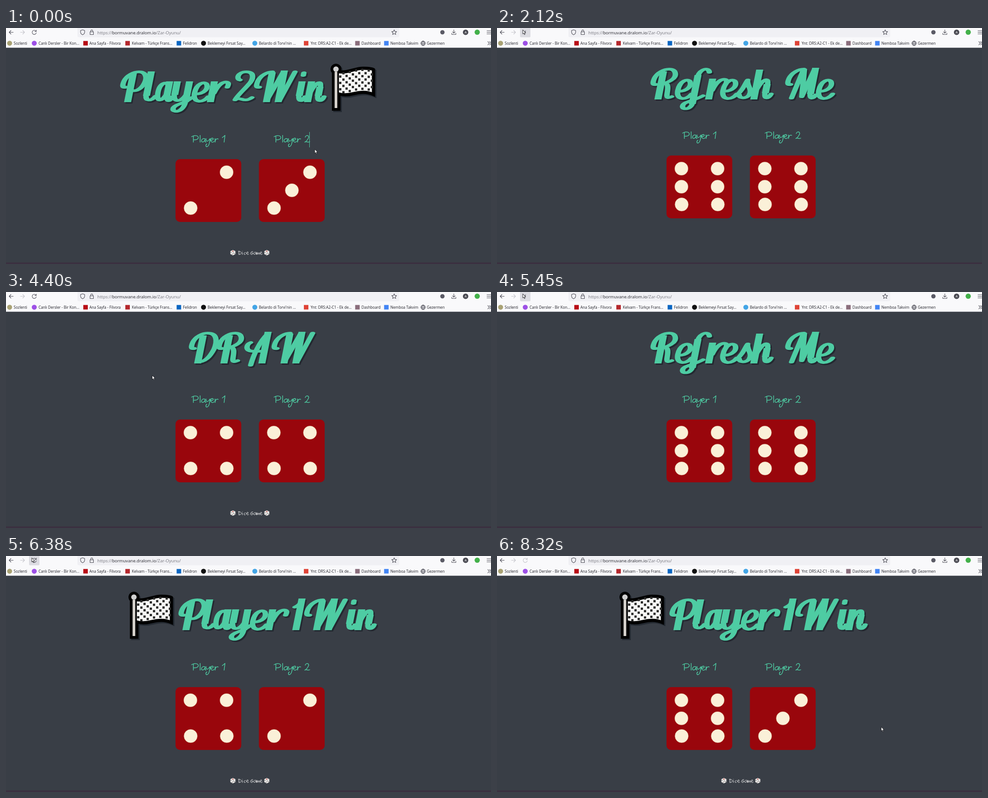
Write an HTML page that moves like this. It is 1073x522 px and loops after 8420 ms.

```html
<!DOCTYPE html>
<html lang="tr">
<head>
<meta charset="utf-8">
<title>Dice Game</title>
<style>
html, body { margin: 0; width: 100%; height: 100%; overflow: hidden; background: #393e46; }
svg { display: block; width: 1073px; height: 522px; }
text { font-family: "Open Sans", "Noto Sans", sans-serif; }
.line { fill: none; stroke: #4b4b55; stroke-width: 1.1; stroke-linecap: round; stroke-linejoin: round; }
.title { filter: drop-shadow(3px 3px 0 #232931); }
.pen { fill: none; stroke: #4ecca3; stroke-width: 7.8; stroke-linejoin: round; }
.pen .curve { stroke-width: 6; stroke-linecap: round; }
.hand { fill: none; stroke-width: 1.5; stroke-linecap: round; stroke-linejoin: round; }
.pip { fill: #faf0d8; stroke: #d9a184; stroke-width: .5; }
</style>
</head>
<body>
<svg viewBox="0 0 1073 522">
  <rect width="1073" height="522" fill="#393e46"/>
  <rect y="518.5" width="1073" height="4" fill="#3b3040"/>
  <g id="page"></g>
  <rect width="1073" height="43.5" fill="#f9f9fb"/>
  <path d="M0 43.3H1073" stroke="#cfcfd6" stroke-width=".7"/>
  <path d="M158 0H870V17Q870 20.5 866 20.5H162Q158 20.5 158 17Z" fill="#f0f0f4"/>
  <rect id="reloadBox" x="51" y="-4" width="23" height="24.5" rx="2"/>
  <rect id="markBox" x="54" y="25" width="111" height="17" rx="2" fill="#dcdce2"/>
  <g class="line">
    <path d="M16 9.5H7M11 5.5L7 9.5L11 13.5"/>
    <path d="M32 9.5H41M37 5.5L41 9.5L37 13.5" stroke="#c4c4ca"/>
    <path id="reload" d="M66.3 7A4.6 4.6 0 1 0 67 10.5M67 4.5V7.8H63.7"/>
    <path id="stop" d="M59.5 6.5L63.500 10.500M63.500 6.500L59.500 10.500"/>
    <path d="M169.500 4L174 5.600V9C174 12 172 14 169.500 15C167 14 165 12 165 9V5.600Z"/>
    <path d="M186 8.500H193.500V14.500H186ZM187.500 8.500V6.200A2.300 2.300 0 0 1 192 6.200V8.500"/>
    <path d="M858.800 4L860.400 7.600L864.300 8L861.400 10.600L862.200 14.400L858.800 12.400L855.400 14.400L856.200 10.600L853.300 8L857.200 7.600Z"/>
    <path d="M990.800 4V11M987.800 8.300L990.800 11.300L993.800 8.300M986.300 11.500V14.300H995.300V11.500"/>
    <path d="M1064 6H1073M1064 9.500H1073M1064 13H1073"/>
    <path d="M1066 30L1069.500 33.700L1066 37.400M1070 30L1073.500 33.700L1070 37.400"/>
    <circle cx="922.800" cy="33.700" r="4.800"/>
    <path d="M918 33.700H927.600M922.800 29C919.500 32 919.500 36 922.800 38.500C926 36 926 32 922.800 29"/>
  </g>
  <circle cx="965.500" cy="9.500" r="4.800" fill="#5b5b66"/>
  <circle cx="1016.800" cy="9.500" r="6" fill="#4a4a52"/>
  <text x="1016.800" y="12.300" font-size="7.500" fill="#fff" text-anchor="middle">A</text>
  <circle cx="1042.500" cy="9.300" r="5.800" fill="#43b04a"/>
  <text x="202" y="13.500" font-size="9.600" fill="#77777f"><tspan>https:</tspan><tspan>//</tspan><tspan fill="#25252c">bormuvane.dralom.io</tspan><tspan>/Zar-Oyunu/</tspan></text>
  <g id="marks" font-size="8.200" fill="#1d1d24"></g>
  <circle id="click" r="8.500" fill="#ece33a" opacity=".9"/>
  <path id="cursor" d="M0 0V9.200L2.100 7.300L3.600 10.700L5.100 10L3.600 6.800H6.400Z" fill="#fff" stroke="#15151a" stroke-width=".9"/>
</svg>
<script>
const LOOP = 8420;
const $ = id => document.getElementById(id);

// Broad-pen lettering: [flat-ended stems, round-ended curves]; x is in units of two pixels.
const swash = 'M3 -33C-1 -31 -1 -39 0 -47C2 -60 9 -67 14 -67';
const SCRIPT = {
  P: ['M8.500 -64V0', swash + 'C22 -67 25 -55 23 -43C21 -30 16 -23 11 -26'],
  l: ['M5 -68V-14', 'M4.500 -16C4.500 -1 12 -2 15 -13'],
  a: ['M14 -46V-14', 'M13 -38C11 -46 3 -44 3.500 -20C4 2 10 -2 13.500 -18M14.500 -14C14.500 0 19 0 20 -12'],
  y: ['M4.500 -46V-16M18 -46V0', 'M4 -18C4.500 2 13 0 17 -16M18 -2C18 26 4 24 6 12C8 4 18 2 24 -10'],
  e: ['', 'M5 -18C15 -18 18 -30 16 -38C13 -48 4 -42 4 -20C4 3 16 2 20 -12'],
  r: ['M5 -46V0', 'M7 -20C10 -40 15 -46 19 -44C22 -42 21 -37 20.500 -33'],
  1: ['M8 -70V0', 'M8 -64C7 -56 4 -53 2 -51'],
  2: ['', 'M6 -49C1 -52 2 -67 11 -67C21 -67 21 -50 16 -38C12 -26 6 -14 5 -5C10 -14 15 3 23 -10'],
  W: ['M14 -66V0M27 -70V0', swash + 'M14 -3L26 -67M28 -3L39 -67'],
  i: ['M5 -46V-14', 'M4.500 -16C5 0 10 0 11.500 -12M5 -65v6'],
  n: ['M4 -46V0M14.500 -34V-14', 'M5 -22C8 -42 15 -52 15 -32M14 -16C14 0 20 0 21 -12'],
  D: ['M10 -62V0', swash + 'C25 -67 27 -50 25 -32C22 -14 18 -3 9 -3'],
  R: ['M8.500 -62V0', swash + 'C22 -67 24 -54 21 -46C18 -40 15 -37 11 -36C18 -37 17 -20 17.500 -10C18 -3 20 -3 23 -6'],
  A: ['M21 -70V0', 'M21 -66C14 -50 10 -20 9 4M4 -46C-1 -42 0 -27 8 -27H21'],
  f: ['M8 -54V10', 'M8 -52C9 -68 18 -72 20 -60M8 8C8 24 -4 24 -2 12C0 4 10 2 18 -8'],
  s: ['', 'M2 -9C8 -20 9 -36 11 -43C11 -30 19 -22 16 -10C13 0 5 -3 5 -10'],
  h: ['M6 -66V0M17.500 -34V-14', 'M7 -22C11 -44 18 -52 18 -32M17 -16C17 0 22 0 24 -12'],
  M: ['M27 -70V-12', swash + 'M14 -67L7 -3M15 -66L18 -6L26 -66M26.500 -14C27 0 31 0 33 -10']
};

// Thin handwriting, one stroke per letter.
const HAND = {
  P: 'M4 -13V0M0 -12C6 -16 15 -15 15 -10C15 -6 9 -5 4 -5',
  l: 'M1 -15V0',
  a: 'M8 -7C4 -10 0 -6 0 -3C0 1 6 1 8 -6C8 -2 8 0 10 0',
  y: 'M0 -8C0 -1 4 0 8 -7M9 -8C8 0 7 9 2 10C-1 10 -1 5 2 4',
  e: 'M0 -4C6 -4 8 -8 4 -9C0 -9 -1 -3 2 -1C4 1 7 0 8 -2',
  r: 'M0 -8V0C0 -5 3 -9 7 -7',
  1: 'M0 -10L6 -15L4 0',
  2: 'M1 -11C3 -17 11 -15 8 -9C6 -5 2 -1 0 0C4 -3 7 2 11 -1',
  D: 'M2 -11V0M0 -11C8 -12 11 -7 10 -4C9 -1 5 0 2 0',
  i: 'M0 -7V0M0 -11v.1',
  c: 'M6 -7C1 -8 -1 0 3 0C5 0 6 -1 6 -1',
  G: 'M8 -10C3 -12 -1 -5 1 -1C4 1 8 0 8 -5H4',
  m: 'M0 -8V0C0 -5 4 -11 4 0C4 -5 9 -11 9 0'
};

function script(text, xs, baseline) {
  const glyphs = [...text.replace(' ', '')].map((ch, i) => {
    const [stems, curves] = SCRIPT[ch];
    return `<g transform="matrix(2 0 -.2 1 ${xs[i]} ${baseline})">
      <path d="${stems}"/><path class="curve" d="${curves}"/></g>`;
  }).join('');
  return `<g class="pen" role="img" aria-label="${text}">${glyphs}</g>`;
}

function hand(text, xs, x, y, scale = 1, color = '#4ecca3') {
  const glyphs = [...text.replace(' ', '')].map((ch, i) =>
    `<path transform="translate(${xs[i]})scale(${scale})" d="${HAND[ch]}"/>`).join('');
  return `<g class="hand" role="img" aria-label="${text}" transform="translate(${x} ${y})"
    stroke="${color}">${glyphs}</g>`;
}

function flag(x) {
  let checks = '';
  for (let i = 0; i < 11; i++)
    for (let j = 0; j < 7; j++)
      if ((i + j) % 2)
        checks += `<rect x="${18 + 7 * i}" y="${94 + 4 * Math.cos(i * .45) + 7 * j}" width="5" height="5"/>`;
  return `<g transform="translate(${x})">
    <path d="M2 92H21V183H2Z"/><circle cx="11" cy="91" r="12"/>
    <path d="M14 96C36 101 51 89 71 89C83 89 91 90 94 92V147C81 141 66 141 51 145C36 149 23 148 14 145Z"
      fill="#f8f8f6" stroke="#000" stroke-width="7"/>
    <g fill="#2c2c2b">${checks}</g>
    <path d="M11 97V177" stroke="#d3cfca" stroke-width="6"/><circle cx="11" cy="91" r="6" fill="#d0d0d0"/>
  </g>`;
}

function die(x, y, value) {
  const corners = [[113, 29], [33.5, 108.3], [33, 29], [113.5, 108.3]];
  const pips = value > 1 ? corners.slice(0, value > 3 ? 4 : 2) : [];
  if (value % 2) pips.push([73, 69]);
  if (value === 6) pips.push([33, 69], [113, 69]);
  return `<g transform="translate(${x} ${y})"><rect width="145.500" height="139" rx="10" fill="#99060c"/>
    ${pips.map(([cx, cy]) => `<circle class="pip" cx="${cx}" cy="${cy}" r="14.800"/>`).join('')}</g>`;
}

function cube(x, y) {
  return `<g transform="translate(${x} ${y})"><path d="M0 -6L5.500 -3.500V3L0 6L-5.500 3V-3.500Z" fill="#f4f2f0"/>
    <path d="M-5.500 -3.500L0 -1L5.500 -3.500M0 -1V6" fill="none" stroke="#a9a5a5" stroke-width=".7"/>
    <circle cy="-3.500" r="1.200" fill="#b3332e"/>
    <g fill="#333"><circle cx="-3.800" cy="-.5" r=".8"/><circle cx="-1.700" cy="3" r=".8"/>
    <circle cx="1.700" cy="1" r=".8"/><circle cx="3.800" cy="2" r=".8"/></g></g>`;
}

const shift = (xs, d) => xs.map(x => x + d);
const player = [252, 298, 325, 361, 405, 442, 496], win = [548, 636, 659];
const TITLES = {
  two: flag(719) + script('Player2Win', [...player, ...win], 164),
  one: flag(272) + script('Player1Win', [...shift(player, 129), ...shift(win, 111)], 164),
  draw: script('DRAW', [404, 465, 524, 587], 158),
  start: script('Refresh Me', [339, 388, 418, 458, 488, 524, 556, 637, 700], 158)
};

function page(title, first, second) {
  const dy = title === 'draw' || title === 'start' ? -8 : 0;
  const letters = [0, 18, 22, 32, 42, 52, 68];
  const footer = title === 'start' ? '' : cube(502, 497 + dy) + cube(577, 497 + dy) +
    hand('Dice Game', [0, 9, 12, 18, 27, 34, 41, 48], 514, 501 + dy, .65, '#f4f4f4');
  return `<g class="title">${TITLES[title]}</g>` +
    hand('Player 1', letters, 410.5, 252.5 + dy) +
    hand('Player 2', letters, 593, 252.5 + dy) +
    die(375, 290 + dy, first) + die(559.5, 290 + dy, second) + footer;
}

const PAGES = [
  [0, 'two', 2, 3], [2090, 'start', 6, 6], [2150, 'draw', 4, 4],
  [5390, 'start', 6, 6], [5480, 'two', 3, 5],
  [6290, 'start', 6, 6], [6350, 'one', 4, 2],
  [7220, 'start', 6, 6], [7280, 'two', 2, 4],
  [7990, 'start', 6, 6], [8050, 'one', 6, 3]
];
$('page').innerHTML = PAGES.map(([, ...state]) => `<g>${page(...state)}</g>`).join('') +
  '<path id="caret" d="M671.500 230V264" stroke="#4ecca3"/>';
const layers = [...$('page').children].slice(0, PAGES.length);

// [icon x, shape, colour, text x, text]
const MARKS = [
  [8, 'o', '#a9a274', 17, 'Sozlenti'],
  [62.5, 'o', '#9d50e6', 72, 'Canlı Dersler - Bir Kon...'],
  [176, 's', '#b80d16', 184.5, 'Ana Sayfa - Filvora'],
  [269, 's', '#b5282d', 278.5, 'Kelvam - Türkçe Frans...'],
  [382.5, 's', '#0a66c2', 391.5, 'Felidron'],
  [437, 'o', '#111', 446, 'Beklemeyi Fırsat Say...'],
  [550.5, 'o', '#43a5e6', 559.5, "Belardo di Torvi'nin ..."],
  [664, 's', '#df4437', 674, 'Ynt: DRS:A2-C1 - Ek de...'],
  [777.5, 's', '#8b6e7c', 786.5, 'Dashboard'],
  [841.5, 's', '#4285f4', 850.5, 'Nemboa Takvim'],
  [0, '', '', 931, 'Gezermen']
];
$('marks').innerHTML = MARKS.map(([x, shape, color, tx, label]) =>
  (shape === 'o' ? `<circle cx="${x}" cy="33.700" r="5.500" fill="${color}"/>` :
   shape === 's' ? `<rect x="${x - 5}" y="28.700" width="10" height="10" fill="${color}"/>` : '') +
  `<text x="${tx}" y="37">${label}</text>`).join('');

const PATH = [
  [0, 683, 268], [670, 683, 268], [1270, 87, 25], [1490, 57, 4],
  [2770, 57, 4], [3070, 472, 312], [3300, 536, 420], [3600, 438, 487],
  [3760, 592, 440], [3940, 536, 328], [4330, 536, 328], [4490, 57, 4],
  [8060, 57, 4], [8320, 850, 378], [LOOP, 850, 378]
];
const CLICKS = [1990, 4790, 6150, 7120, 7880];

function cursorAt(t) {
  const i = PATH.findIndex(p => p[0] > t);
  const [t0, x0, y0] = PATH[i - 1], [t1, x1, y1] = PATH[i];
  const k = (t - t0) / (t1 - t0);
  return [x0 + (x1 - x0) * k, y0 + (y1 - y0) * k];
}

const show = (el, on) => el.setAttribute('visibility', on ? 'visible' : 'hidden');
const between = (t, a, b) => t >= a && t < b;

function render(t) {
  const current = PAGES.findLastIndex(p => p[0] <= t);
  layers.forEach((layer, i) => layer.style.display = i === current ? '' : 'none');
  show($('caret'), t < 500 || between(t, 1000, 1490));

  const [x, y] = cursorAt(t);
  const pressed = CLICKS.some(c => between(t, c, c + 110));
  const loading = PAGES[current][1] === 'start';
  $('cursor').setAttribute('transform', `translate(${x} ${y})`);
  $('click').setAttribute('transform', `translate(${x} ${y + 1.5})`);
  show($('click'), pressed);
  show($('reloadBox'), x > 50 && x < 74 && y < 20);
  $('reloadBox').setAttribute('fill', pressed ? '#cfcfd6' : '#dcdce2');
  show($('markBox'), x > 54 && x < 165 && y >= 24 && y < 42);
  show($('stop'), loading);
  show($('reload'), !loading);
  const disabled = between(t, 2150, 2535) || t >= 8050;
  $('reload').style.stroke = disabled ? '#c0c0c6' : '#4b4b55';
}

function tick() {
  render(performance.now() % LOOP);
  requestAnimationFrame(tick);
}
tick();
</script>
</body>
</html>
```
